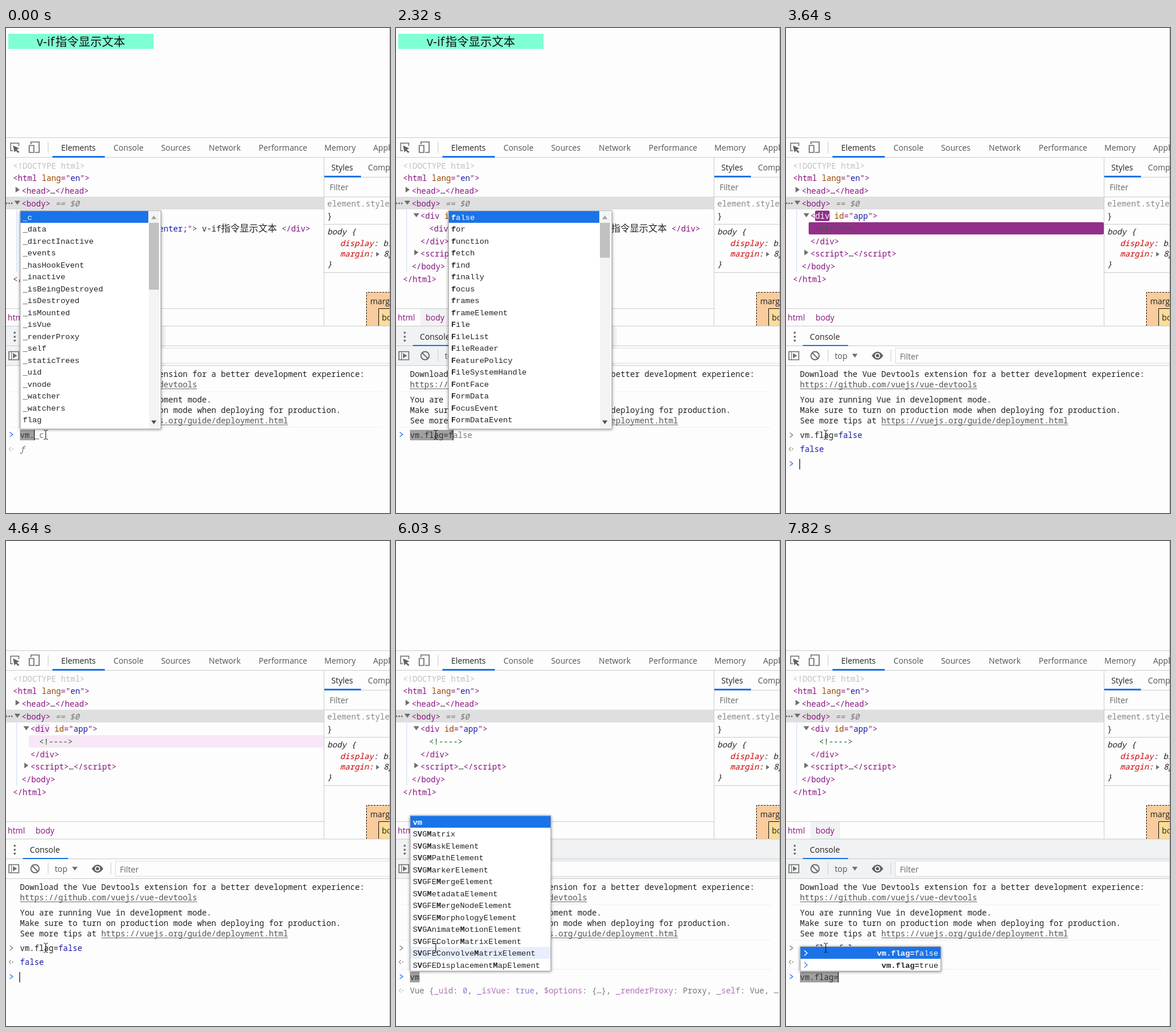
Animation of 661 by 834 pixels, one loop 8000 ms. Source, as an HTML page with a canvas:

```html
<!DOCTYPE html>
<html lang="en">
<head>
<meta charset="utf-8">
<style>
html, body { margin: 0; width: 100%; height: 100%; overflow: hidden; background: #fdfdfd; }
canvas { display: block; }
</style>
</head>
<body>
<canvas id="stage" width="661" height="834"></canvas>
<script>
const ctx = document.getElementById('stage').getContext('2d');
const LOOP = 8000, ENTER = 3360, RETYPE = 5190;
const MONO = '13.74px "Noto Sans Mono", "Noto Sans CJK SC", monospace';
const UI = '13.8px "Open Sans", sans-serif';
const LIST = '13.54px "Liberation Mono", monospace';
const BLUE = '#1a73e8', TAG = '#881280', ATTR = '#994500', VAL = '#1a1aa6', INK = '#222', RULE = '#cccccc';

const words = s => s.split(' ');
const members = words('_c _data _directInactive _events _hasHookEvent _inactive _isBeingDestroyed _isDestroyed _isMounted _isVue _renderProxy _self _staticTrees _uid _vnode _watcher _watchers flag _updateModel');
const falseWords = words('false finally frameElement FeaturePolicy FileSystemHandle FederatedCredential FileSystemFileHandle FinalizationRegistry FontFaceSetLoadEvent FileSystemDirectoryHandle FileSystemWritableFileStream default defaultstatus defaultStatus CSSFontFaceRule CSSKeyframeRule CSSKeyframesRule HTMLFrameElement CSSTransformRule');
const fWords = words('false for function fetch find finally focus frames frameElement File FileList FileReader FeaturePolicy FileSystemHandle FontFace FormData FocusEvent FormDataEvent FontFaceSetLoadEvent');
const vWords = words('values var void vm Vue visualViewport valueOf VTTCue ValidityState VisualViewport VideoFrame VideoDecoder VideoEncoder VideoColorSpace VideoPlaybackQuality eval removeEventListener navigator SVGElement');
const vmWords = ['vm', ...words('Matrix MaskElement MPathElement MarkerElement FEMergeElement MetadataElement FEMergeNodeElement FEMorphologyElement AnimateMotionElement FEColorMatrixElement FEConvolveMatrixElement FEDisplacementMapElement').map(s => 'SVG' + s)];
const history = ['vm.flag=false', 'vm.flag=true'];

const wide = { x: 90, w: 281, thumb: 145 };
const own = { x: 24, items: members, query: '', thumb: 115 };
const past = { x: 24, items: history, query: 'vm.flag=', past: true };
const only = query => ({ x: 49, items: ['flag'], query });

// time, typed, suggested, preview, popup, caret hidden
const steps = [
  [0, 'vm.', '_c', 'ƒ', own],
  [440, 'vm.', '_c', 'ƒ', own, true],
  [720, 'vm.f', 'lag', 'true', { x: 24, items: words('flag _self $refs valueOf isPrototypeOf __defineGetter__'), query: 'f' }],
  [990, 'vm.fl', 'ag', 'true', { x: 24, items: ['flag', ...history], query: 'fl' }],
  [1280, 'vm.flag', '', 'true'],
  [1580, 'vm.flag=', '', 'true', past],
  [1730, 'vm.flag=', '', '', past],
  [2320, 'vm.flag=f', 'alse', '', { ...wide, items: fWords, query: 'f', thumb: 60 }],
  [2630, 'vm.flag=fa', 'lse', '', { ...wide, items: falseWords, query: 'fa', thumb: 100 }],
  [2780, 'vm.flag=fal', 'se', '', { ...wide, items: falseWords, query: 'fal' }],
  [2930, 'vm.flag=fals', 'e', '', { ...wide, items: ['false', 'defaultstatus', 'defaultStatus'], query: 'fals', thumb: 0 }],
  [3060, 'vm.flag=false', '', ''],
  [ENTER, '', '', ''],
  [3860, '', '', '', null, true],
  [4360, '', '', ''],
  [4790, '', '', '', null, true],
  [RETYPE, 'v', 'alues', 'ƒ', { x: 24, items: vWords, query: 'v', thumb: 115 }],
  [5440, 'vm', '', 'ƒ', { x: 24, items: vmWords, query: 'vm', hover: 11 }],
  [5590, 'vm', '', 'Vue', { x: 24, items: vmWords, query: 'vm', hover: 11 }],
  [6030, 'vm', '', 'Vue', { x: 24, items: vmWords, query: 'vm', hover: 11 }, true],
  [6330, 'vm.', '_c', 'ƒ', own],
  [6630, 'vm.f', 'lag', 'false', only('f')],
  [6760, 'vm.fl', 'ag', 'false', only('fl')],
  [6900, 'vm.fla', 'g', 'false', only('fla')],
  [7050, 'vm.flag', '', 'false'],
  [7520, 'vm.flag=', '', 'false', past],
  [7670, 'vm.flag=', '', '', past],
];

function rect(x, y, w, h, color) { ctx.fillStyle = color; ctx.fillRect(x, y, w, h); }
const hline = (x, y, w, color = RULE) => rect(x, y, w, 1, color);
const vline = (x, y, h, color = RULE) => rect(x, y, 1, h, color);

function text(s, x, y, color = INK, font = MONO) {
  ctx.font = font;
  ctx.fillStyle = color;
  ctx.fillText(s, x, y);
  return x + ctx.measureText(s).width;
}

// Alternating text and colour arguments
function runs(x, y, ...parts) {
  for (let i = 0; i < parts.length; i += 2) x = text(parts[i], x, y, parts[i + 1]);
  return x;
}

function path(points, color, width = 1.5, closed = false, fill = false) {
  ctx.beginPath();
  for (let i = 0; i < points.length; i += 2) ctx.lineTo(points[i], points[i + 1]);
  if (closed) ctx.closePath();
  if (fill) { ctx.fillStyle = color; ctx.fill(); return; }
  ctx.strokeStyle = color;
  ctx.lineWidth = width;
  ctx.stroke();
}
const fillPath = (points, color) => path(points, color, 0, true, true);

function disc(x, y, r, color, width = 0) {
  ctx.beginPath();
  ctx.arc(x, y, r, 0, Math.PI * 2);
  ctx.fillStyle = ctx.strokeStyle = color;
  ctx.lineWidth = width;
  width ? ctx.stroke() : ctx.fill();
}

const down = (x, y, s = 5, color = '#6e6e6e') => fillPath([x - s, y - s * .7, x + s, y - s * .7, x, y + s * .7], color);
const right = (x, y, s = 5) => fillPath([x - s * .7, y - s, x + s * .7, y, x - s * .7, y + s], '#6e6e6e');

function page(shown) {
  if (!shown) return;
  rect(4, 10, 250, 26, '#7fffd4');
  text('v-if', 53, 31, '#111', '21.5px "Open Sans", sans-serif');
  text('指令显示文本', 85, 31, '#111', '20px "Noto Sans CJK SC", sans-serif');
}

function tabs() {
  hline(0, 188, 661);
  hline(0, 222, 661);
  path([12, 211, 8, 211, 8, 198, 22, 198, 22, 203], '#6e6e6e');
  fillPath([12, 202, 23, 207, 18.5, 209, 23, 213, 21, 215, 17, 211, 14.5, 214], '#5f6368');
  path([43, 200, 43, 196, 57, 196, 57, 214, 50, 214], '#6e6e6e', 1.7);
  path([40, 202, 48, 202, 48, 214, 40, 214], '#6e6e6e', 1.7, true);
  vline(72, 196, 19);
  const names = { Elements: 95, Console: 185, Sources: 267, Network: 349, Performance: 435, Memory: 548, Application: 632 };
  for (const [name, x] of Object.entries(names)) text(name, x, 211, name === 'Elements' ? '#222' : '#505357', UI);
  rect(80, 220, 90, 3, BLUE);
}

function flash(t) {
  const mix = (a, b, k) => Math.round(a + (b - a) * k);
  const fade = Math.min(1, Math.max(0, (t - 3780) / 780));
  const alpha = t < ENTER ? 0 : Math.min(1, Math.max(0, (4790 - t) / 230));
  return {
    on: alpha > 0,
    back: `rgba(${mix(146, 245, fade)},${mix(48, 219, fade)},${mix(137, 244, fade)},${alpha})`,
    ink: `rgb(${mix(255, 136, fade)},${mix(255, 18, fade)},${mix(255, 128, fade)})`,
  };
}

function elements(t) {
  const glow = flash(t);
  rect(0, 290, 547, 22, '#dfdfdf');
  vline(18, 313, 107, '#c9dcf8');
  text('<!DOCTYPE html>', 12, 242, '#c0c0c0');
  runs(12, 263, '<html ', TAG, 'lang', ATTR, '="', TAG, 'en', VAL, '">', TAG);
  right(20, 278);
  runs(27, 285, '<head>', TAG, '…', INK, '</head>', TAG);
  for (let x = 1; x < 12; x += 4.5) disc(x, 301.5, 1.4, '#6e6e6e');
  down(19.5, 300.5);
  text('<body>', 27, 307, TAG);
  text('== $0', 85, 307, '#777', 'italic ' + MONO);
  down(35, 322);
  if (glow.on) {
    ctx.fillStyle = glow.back;
    ctx.beginPath();
    ctx.roundRect(50, 314, 25, 18, 2);
    ctx.roundRect(39, 334, 508, 21, 2);
    ctx.fill();
  }
  runs(42, 328, '<', TAG, 'div', glow.on ? glow.ink : TAG, ' id', ATTR, '="', TAG, 'app', VAL, '">', TAG);
  if (t < ENTER) {
    let x = runs(57, 350, '<div ', TAG, 'style', ATTR, '="', TAG, 'text-align: center;', VAL, '">', TAG, ' v-if', INK);
    x = text('指令显示文本', x, 350, INK, '16px "Noto Sans CJK SC", sans-serif');
    text(' </div>', x, 350, TAG);
  } else text('<!---->', 57, 350, '#236e25');
  text('</div>', 42, 372, TAG);
  right(35, 386);
  runs(42, 393, '<script>', TAG, '…', INK, '<\/script>', TAG);
  text('</body>', 27, 415, TAG);
  text('</html>', 12, 437, TAG);
  hline(0, 482, 547);
  if (t < ENTER || t >= RETYPE) rect(42, 483, 51, 29, '#f0f2f3');
  text('html', 3, 503, TAG, UI);
  text('body', 51, 503, TAG, UI);
}

function styles() {
  const slant = 'italic ' + MONO;
  vline(547, 223, 289);
  text('Styles', 560, 245, '#222', UI);
  text('Computed', 623, 245, '#505357', UI);
  hline(548, 256, 113);
  rect(548, 254, 63, 3, BLUE);
  text('Filter', 557, 279, '#666', UI);
  hline(548, 290, 113);
  text('element.style {', 553, 307, '#888');
  text('}', 553, 328);
  hline(548, 337, 113);
  text('body {', 553, 355, INK, slant);
  text(': block;', text('display', 575, 375, '#c80000', slant), 375, INK, slant);
  text(':', text('margin', 575, 393, '#c80000', slant), 393, INK, slant);
  right(640, 389, 4);
  text('8px;', 650, 393, INK, slant);
  text('}', 553, 411, INK, slant);
  hline(548, 420, 113);
  rect(620, 454, 41, 58, '#f9cc9d');
  ctx.setLineDash([3, 2]);
  path([620.5, 512, 620.5, 454.5, 661, 454.5], '#111', 1);
  ctx.setLineDash([]);
  text('margin', 627, 475, '#222', UI);
  rect(641, 482, 20, 30, '#fddc9a');
  path([641.5, 512, 641.5, 482.5, 661, 482.5], '#111', 1);
  text('border', 647, 503, '#222', UI);
}

function drawer(t) {
  const shade = t < 2320 ? 275 : t < ENTER ? 380 : t < RETYPE ? 0 : 661;
  rect(0, 513, shade, 67, '#f0f2f3');
  hline(0, 512, 661);
  hline(0, 546, 661);
  hline(0, 580, 661);
  for (const y of [524, 531, 537.5]) disc(15, y, 1.8, '#5f6368');
  text('Console', 41, 536, '#222', UI);
  rect(29, 545, 78, 2, BLUE);
  path([5, 556.5, 22, 556.5, 22, 570.5, 5, 570.5], '#6e6e6e', 1.6, true);
  vline(9, 556, 15, '#6e6e6e');
  fillPath([12, 559, 19, 563.5, 12, 568], '#6e6e6e');
  disc(50, 563.5, 7, '#6e6e6e', 2);
  path([45, 558.5, 55, 568.5], '#6e6e6e', 2);
  vline(72, 553, 20);
  text('top', 84, 569, '#505357', UI);
  down(118.5, 563.5, 4.7);
  ctx.beginPath();
  ctx.moveTo(147.5, 563.5);
  ctx.quadraticCurveTo(157.5, 549.5, 167.5, 563.5);
  ctx.quadraticCurveTo(157.5, 577.5, 147.5, 563.5);
  ctx.fillStyle = '#5f6368';
  ctx.fill();
  disc(157.5, 563.5, 4.6, '#fdfdfd');
  disc(157.5, 563.5, 2.8, '#5f6368');
  vline(180, 553, 20);
  rect(188, 550, 473, 27, '#dadce0');
  rect(189, 551, 472, 25, '#fdfdfd');
  text('Filter', 196, 570, '#666', UI);
}

function link(s, x, y) {
  const end = text(s, x, y, '#545454');
  hline(x, y + 2, end - x, '#6a6a6a');
}

const prompt = (y, color) => path([6.5, y - 4, 11.5, y, 6.5, y + 4], color, 1.6);
function reply(y, color) {
  path([8.5, y - 3.5, 5.5, y, 8.5, y + 3.5], color, 1.3);
  disc(11.5, y, 1.2, color);
}

function preview(s, y) {
  reply(y - 5, '#c4c4c4');
  if (s === 'ƒ') text('ƒ', 24, y, '#777', 'italic ' + MONO);
  else if (s === 'Vue') {
    const k = '#b070b5', g = '#777', v = '#8480d0';
    runs(24, y, 'Vue {', g, '_uid', k, ': ', g, '0', v, ', ', g, '_isVue', k, ': ', g, 'true', v, ', ', g,
      '$options', k, ': {…}, ', g, '_renderProxy', k, ': Proxy, ', g, '_self', k, ': Vue, …}', g);
  } else text(s, 24, y, '#8480d0');
}

function consoleLog(t, [, typed, hint, result, popup, hidden]) {
  text('Download the Vue Devtools extension for a better development experience:', 24, 600);
  link('https://github.com/vuejs/vue-devtools', 24, 618);
  text('You are running Vue in development mode.', 24, 644);
  text('Make sure to turn on production mode when deploying for production.', 24, 662);
  link('https://vuejs.org/guide/deployment.html', text('See more tips at ', 24, 680), 680);
  const entered = t >= ENTER, y = entered ? 755 : 705;
  if (!entered || t >= RETYPE) {
    hline(8, 625, 638, '#f2f2f2');
    hline(8, 686, 638, '#f0f0f0');
    if (entered) hline(8, 736, 638, '#f0f0f0');
  }
  if (entered) {
    prompt(700, '#8a8a8a');
    runs(24, 705, 'vm.flag=', INK, 'false', VAL);
    reply(724, '#9a9a9a');
    text('false', 24, 729, VAL);
  }
  prompt(y - 6, '#3f83ee');
  ctx.font = MONO;
  const end = 24 + ctx.measureText(typed).width;
  rect(24, y - 14, end - 24, 18, '#a0a0a0');
  text(typed, 24, y, '#333');
  text(hint, end, y, '#777');
  if (!hidden) rect(typed ? end - .5 : 23, y - 14, 1.2, 18, '#111');
  if (result) preview(result, y + (entered ? 23 : 24));
  if (popup) suggestions(popup, y - 15);
}

// Indices of a subsequence match, preferring capitals
function matches(item, query) {
  const found = new Set();
  let from = 0;
  for (const c of query) {
    let i = item.indexOf(c.toUpperCase(), from);
    if (i < 0) i = item.indexOf(c, from);
    if (i < 0) break;
    found.add(i);
    from = i + 1;
  }
  return found;
}

function suggestions({ x, w = 242, items, query, thumb, hover, past }, bottom) {
  const pitch = 20.5, h = Math.min(376.5, items.length * pitch + 2), top = bottom - h;
  ctx.save();
  ctx.shadowColor = 'rgba(0,0,0,.45)';
  ctx.shadowBlur = 5;
  ctx.shadowOffsetY = 1;
  rect(x, top, w + 1, h, '#a8a8a8');
  ctx.restore();
  rect(x + 1, top + 1, w - 1, h - 2, '#fff');
  ctx.save();
  ctx.beginPath();
  ctx.rect(x + 1, top + 1, w, h - 2);
  ctx.clip();
  const rowEnd = thumb ? w - 22 : w - 1;
  items.forEach((item, i) => {
    const y = top + 1 + i * pitch, bold = matches(item, query);
    if (i === 0 || i === hover) rect(x + 1, y, rowEnd, pitch, i ? '#e8eefb' : BLUE);
    ctx.font = LIST;
    let cx = past ? x + w - 4 - ctx.measureText(item).width : x + 5;
    const ink = i ? '#222' : '#fff';
    if (past) path([x + 7.5, y + 6, x + 12.5, y + 10.5, x + 7.5, y + 15], i ? '#3f83ee' : '#fff', 1.4);
    [...item].forEach((c, k) => cx = text(c, cx, y + 15, ink, (bold.has(k) ? 'bold ' : '') + LIST));
  });
  if (thumb) {
    const bx = x + w - 20;
    rect(bx, top + 1, 18, h - 2, '#f4f4f4');
    rect(bx, top + 21.5, 17, thumb, '#c1c1c1');
    down(bx + 8.5, top + 12, -4.5, '#a3a3a3');
    down(bx + 8.5, bottom - 12, 4.5, '#505050');
  }
  ctx.restore();
}

function pointer() {
  path([65, 691.5, 67.5, 692, 68.5, 693, 69.5, 692, 72, 691.5], '#111', 1);
  path([65, 707.5, 67.5, 707, 68.5, 706, 69.5, 707, 72, 707.5], '#111', 1);
  path([68.5, 693, 68.5, 706], '#111', 1);
}

function draw(t) {
  rect(0, 0, 661, 834, '#fdfdfd');
  page(t < ENTER);
  tabs();
  elements(t);
  styles();
  drawer(t);
  consoleLog(t, steps.findLast(step => step[0] <= t));
  pointer();
  vline(660, 0, 834, '#b4b4b4');
}

function tick() {
  draw(performance.now() % LOOP);
  requestAnimationFrame(tick);
}
tick();
</script>
</body>
</html>
```
